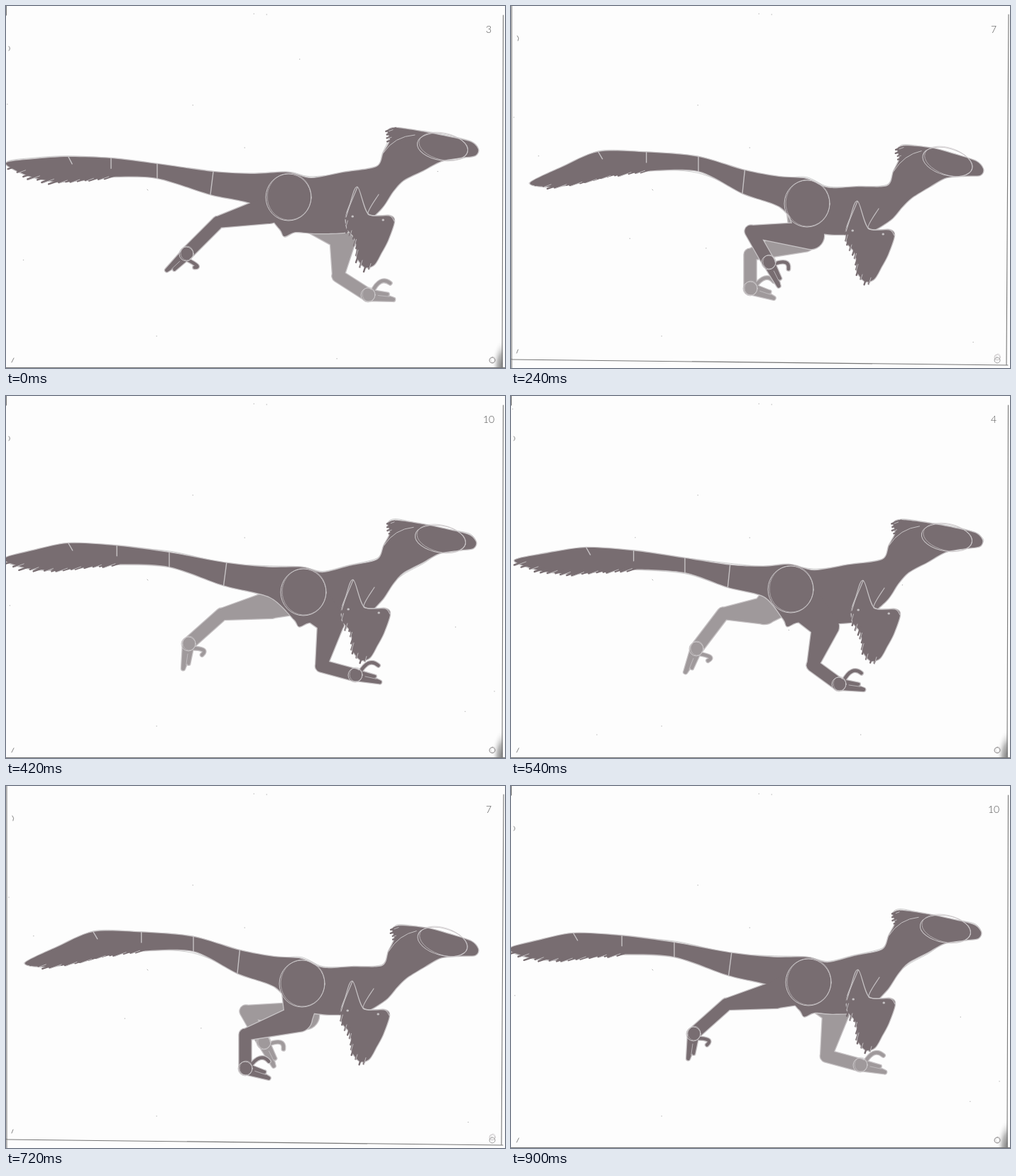
These frames come from a looping animation (703x511 px, 0.96 s). An HTML page:

```html
<!DOCTYPE html>
<html lang="en">
<head>
<meta charset="utf-8">
<title>Run cycle</title>
<style>
html, body { margin: 0; width: 100%; height: 100%; overflow: hidden; background: #fdfdfd; }
svg { display: block; width: 703px; height: 511px; }
path, ellipse { stroke-linecap: round; stroke-linejoin: round; }
text { font: 300 14px Lato, sans-serif; fill: #555; text-anchor: middle; }
.cel { visibility: hidden; animation: show 960ms step-end infinite; animation-delay: calc((var(--i) - 16) * 60ms); }
@keyframes show { 0% { visibility: visible; } 6.25%, 100% { visibility: hidden; } }
</style>
</head>
<body>
<svg id="stage" viewBox="0 0 703 511">
  <defs>
    <radialGradient id="corner" cx="1" cy="1" r="1">
      <stop offset="0" stop-color="#777"/>
      <stop offset=".5" stop-color="#bbb"/>
      <stop offset="1" stop-color="#fdfdfd" stop-opacity="0"/>
    </radialGradient>
  </defs>
</svg>
<script>
const DARK = '#786d71', LIGHT = '#9f999b', LINE = '#c6c2c4';
const STEPS = 16, STRIDE = 8;

// One resting outline; every drawing bends it with a few handles.
const points = s => s.split(' ').map(p => p.split(',').map(Number));
const REST = points('0,222 40,216 88,213 148,215 213,223 292,234 350,237 397,235 430,243 475,235 522,227 532,207 541,190 538,176 550,172 590,178 625,185 655,192 665,202 661,211 640,214 613,219 588,232 560,246 545,262 527,288 490,317 440,321 408,319 392,325 385,314 352,281 288,266 213,243 148,241 105,246 70,248 30,239');
const ARM = points('16,-42 6,-18 0,0 2,17 11,28 15,42 16,58 27,71 40,67 50,50 59,33 68,6 61,-2 31,-4 46,-32');

// step, then tail tip, tail, tail root, hip, neck, head, elbow
const BODY = [
  [0, 0, 222, 88, 213, 213, 223, 398, 270, 522, 227, 615, 199, 479, 298],
  [1, 5, 232, 106, 214, 245, 229, 394, 273, 523, 231, 614, 200, 480, 303],
  [2, 8, 243, 114, 214, 250, 226, 405, 283, 530, 240, 621, 211, 482, 314],
  [4, 27, 250, 123, 206, 264, 213, 417, 279, 530, 254, 615, 220, 472, 318],
  [6, 12, 260, 112, 214, 251, 221, 426, 286, 527, 257, 606, 224, 464, 322],
  [7, -3, 230, 88, 208, 230, 221, 419, 277, 523, 231, 612, 202, 473, 302]
];
// step, then knee, heel, ankle, foot angle; both legs share it half a cycle apart
const LEG = [
  [0, 370, 288, 299, 305, 254, 350, 140],
  [1, 357, 303, 299, 307, 261, 357, 115],
  [2, 384, 308, 302, 307, 295, 361, 113],
  [4, 422, 324, 338, 318, 363, 362, 67],
  [6, 446, 332, 381, 349, 430, 373, 25],
  [7, 458, 318, 444, 381, 492, 394, 16],
  [8, 475, 325, 468, 381, 510, 408, 10],
  [9, 443, 325, 425, 380, 462, 407, 12],
  [10, 430, 325, 386, 368, 424, 407, 18],
  [12, 412, 328, 337, 351, 337, 399, 22],
  [14, 374, 303, 314, 345, 276, 386, 60],
  [15, 372, 295, 304, 308, 257, 350, 102]
];

// Periodic spline through keyed rows
function sample(keys, period, t) {
  const n = keys.length;
  const key = i => keys[(i + n) % n].map((v, j) => j ? v : v + period * Math.floor(i / n));
  const i = keys.filter(k => k[0] <= t).length - 1;
  const [a, b, c, d] = [i - 1, i, i + 1, i + 2].map(key);
  const h = c[0] - b[0], u = (t - b[0]) / h;
  return b.map((v, j) => {
    const m = (c[j] - a[j]) / (c[0] - a[0]) * h;
    const k = (d[j] - b[j]) / (d[0] - b[0]) * h;
    return v + u * (m + u * (3 * (c[j] - v) - 2 * m - k + u * (2 * (v - c[j]) + m + k)));
  }).slice(1);
}
const pairs = a => a.flatMap((v, i) => i % 2 || i + 1 >= a.length ? [] : [[v, a[i + 1]]]);
const clamp = v => Math.max(0, Math.min(1, v));
const num = v => +v.toFixed(1);
const add = ([x, y], dx, dy) => [x + dx, y + dy];

let seed = 1;
const rnd = () => (seed = seed * 16807 % 2147483647) / 2147483647;

const restHandles = pairs(BODY[0].slice(1, 13));

// The belly stays level and the nose dips as the head drops
function warp([x, y], handles) {
  const shift = handles.map((h, i) => h.map((v, k) => v - restHandles[i][k]));
  let i = 0;
  while (i < 4 && x > restHandles[i + 1][0]) i++;
  const x0 = restHandles[i][0], x1 = restHandles[i + 1][0];
  const u = clamp((x - x0) / (x1 - x0));
  const [dx, dy] = [0, 1].map(k => shift[i][k] + (shift[i + 1][k] - shift[i][k]) * u);
  const pitch = Math.max(0, x - 590) * shift[5][1] * .0045;
  return [x + dx, y + dy * clamp((330 - y) / 80) + pitch];
}

function curve(pts, closed) {
  const n = pts.length;
  const at = i => closed ? pts[(i + n) % n] : pts[Math.max(0, Math.min(n - 1, i))];
  let d = 'M' + pts[0].map(num);
  for (let i = 0; i < (closed ? n : n - 1); i++) {
    const [a, b, c, e] = [at(i - 1), at(i), at(i + 1), at(i + 2)];
    const c1 = b.map((v, k) => num(v + (c[k] - a[k]) / 7));
    const c2 = c.map((v, k) => num(v - (e[k] - b[k]) / 7));
    d += `C${c1} ${c2} ${c.map(num)}`;
  }
  return d;
}

const path = (d, stroke, w = 1, fill = 'none') =>
  `<path d="${d}" fill="${fill}" stroke="${stroke}" stroke-width="${w}"/>`;
const line = (...pts) => 'M' + pts.map(p => p.map(num)).join('L');
const sketch = pts => path(curve(pts.map(p => p.map(v => v + (rnd() - .5) * 5)), true), '#bbb', .7);
const ring = ([x, y], rx, ry, turn = 0) => [0, 1].map(k =>
  `<ellipse cx="${num(x + k)}" cy="${num(y - k)}" rx="${rx - k}" ry="${ry}" transform="rotate(${num(turn + k * 4)} ${num(x)} ${num(y)})" fill="none" stroke="#ccc8ca" stroke-width="${1 - k * .4}"/>`).join('');

// Feather strokes hanging from an edge
function fringe(pts, dx, dy, gap) {
  let dark = '', pale = '';
  for (let i = 1; i < pts.length; i++) {
    const [a, b] = [pts[i - 1], pts[i]];
    const n = Math.round(Math.hypot(b[0] - a[0], b[1] - a[1]) / gap);
    for (let k = 0; k < n; k++) {
      const x = num(a[0] + (b[0] - a[0]) * k / n - dx * .5);
      const y = num(a[1] + (b[1] - a[1]) * k / n - dy * .5);
      const s = .7 + rnd() * .5;
      dark += `M${x} ${y}l${num(dx * s)} ${num(dy * s)}`;
      if (k % 2) pale += `M${x} ${y + 1}l${num(dx * s * .9)} ${num(dy * s)}`;
    }
  }
  return path(dark, DARK, 2.4) + path(pale, LINE, .9);
}

// Tapered limb with round ends
function limb(a, ra, b, rb) {
  const len = Math.hypot(b[0] - a[0], b[1] - a[1]);
  const nx = (a[1] - b[1]) / len, ny = (b[0] - a[0]) / len;
  const side = (p, r) => [num(p[0] + nx * r), num(p[1] + ny * r)];
  return `M${side(a, ra)}L${side(b, rb)}A${rb} ${rb} 0 0 0 ${side(b, -rb)}L${side(a, -ra)}A${ra} ${ra} 0 0 0 ${side(a, ra)}Z`;
}

function leg(hip, step) {
  const joints = sample(LEG, STEPS, step);
  const [knee, heel, ankle] = pairs(joints);
  const angle = joints[6] * Math.PI / 180;
  const cos = Math.cos(angle), sin = Math.sin(angle);
  // u runs along the toes, v towards the raised claw
  const foot = (u, v) => [num(ankle[0] + u * cos + v * sin), num(ankle[1] + u * sin - v * cos)];
  const lean = (1 + cos) / 2;
  const shape = limb(hip, 30, knee, 19) + limb(knee, 19, heel, 8) + limb(heel, 8.5, ankle, 8.5)
    + limb(ankle, 8, foot(36, 0), 2.5) + limb(ankle, 8, foot(27, 6), 2);
  const claw = `M${foot(5, 5)}Q${foot(20 * lean - 8, 30)} ${foot(28 * lean, 22)}`;
  return {
    edge: path(shape, LINE, 2.6) + path(claw, LINE, 7),
    fill: color => path(shape, 'none', 0, color) + path(claw, color, 4.5)
      + path(line(foot(14, 2), foot(30, 3)), LINE, .8) + ring(ankle, 10, 10)
  };
}

function paper(no) {
  const tilted = no === 7;
  const edges = tilted ? 'M1 0V511M701 12L698 506M0 499L700 507' : 'M.5 0V13M700.5 13L699 506M0 510.5H703';
  const dust = Array.from({ length: 6 }, () => `M${num(rnd() * 690)} ${num(rnd() * 500)}h.5`).join('');
  return (tilted ? '' : '<rect x="684" y="470" width="16" height="41" fill="url(#corner)"/>')
    + path(edges, '#777', 1.1)
    + path(tilted ? 'M9 42q3 3 1 7M8 490l2-5' : 'M4 57q3 3 0 6M8 503l3-6', '#777', .9)
    + ring([685, tilted ? 496 : 500], 4, 4) + path('M685 496a4 4 0 1 0 .1 0', '#888', .8)
    + path('M349 11h.5M367 12h.5M336 200h.5M199 259l1 1M212 466h.5M263 140h.5' + dust, '#aaa', 1);
}

function cel(i) {
  const no = 3 + i % STRIDE;
  seed = 97 * no;
  const pose = pairs(sample(BODY, STRIDE, i % STRIDE));
  const handles = pose.slice(0, 6), elbow = pose[6];
  const [, , , hip, , head] = handles;
  const body = REST.map(p => warp(p, handles));
  const arm = ARM.map(p => add(elbow, ...p));
  const wing = arm.slice(0, 14);
  const near = leg(hip, i), far = leg(hip, (i + STRIDE) % STEPS);
  const ticks = [[2, 35, .3], [3, 34, .55], [4, 33, 1], [5, 32, 1]].map(([a, b, part]) =>
    line(body[a], body[a].map((v, k) => v + (body[b][k] - v) * part))).join('');
  const nape = `M${body[11].map(num)}Q${add(body[12], 6, -6).map(num)} ${add(body[15], -14, 4).map(num)}`;
  const dots = [add(elbow, 9, -1), add(elbow, 52, 4)].map(p => line(p, add(p, .5, 0))).join('');
  const silhouette = curve(body, true), armShape = curve(wing, true);

  return `<g class="cel" style="--i:${i}">`
    + paper(no)
    + far.edge + far.fill(LIGHT)
    + near.edge + sketch(body) + path(silhouette, LINE, 2.6, DARK) + path(silhouette, 'none', 0, DARK)
    + fringe([...body.slice(34), body[0]], -15, 5, 10)
    + fringe(body.slice(12, 15), -6, 2, 5)
    + near.fill(DARK)
    + path(armShape, LINE, 2.4) + path(armShape, 'none', 0, DARK)
    + fringe(arm.slice(2, 9), -3, 9, 7)
    + path(curve(arm.slice(0, 3)) + curve(arm.slice(11)), LINE, 1.1)
    + path(ticks, LINE, 1.4) + path(nape, LINE) + path(dots, LINE, 3)
    + ring(hip, 32, 33) + ring(head, 36, 19, 9 + (head[1] - 199) * .3)
    + `<text x="680" y="38">${no}</text></g>`;
}

document.getElementById('stage').insertAdjacentHTML('beforeend',
  Array.from({ length: STEPS }, (_, i) => cel(i)).join(''));
</script>
</body>
</html>
```
